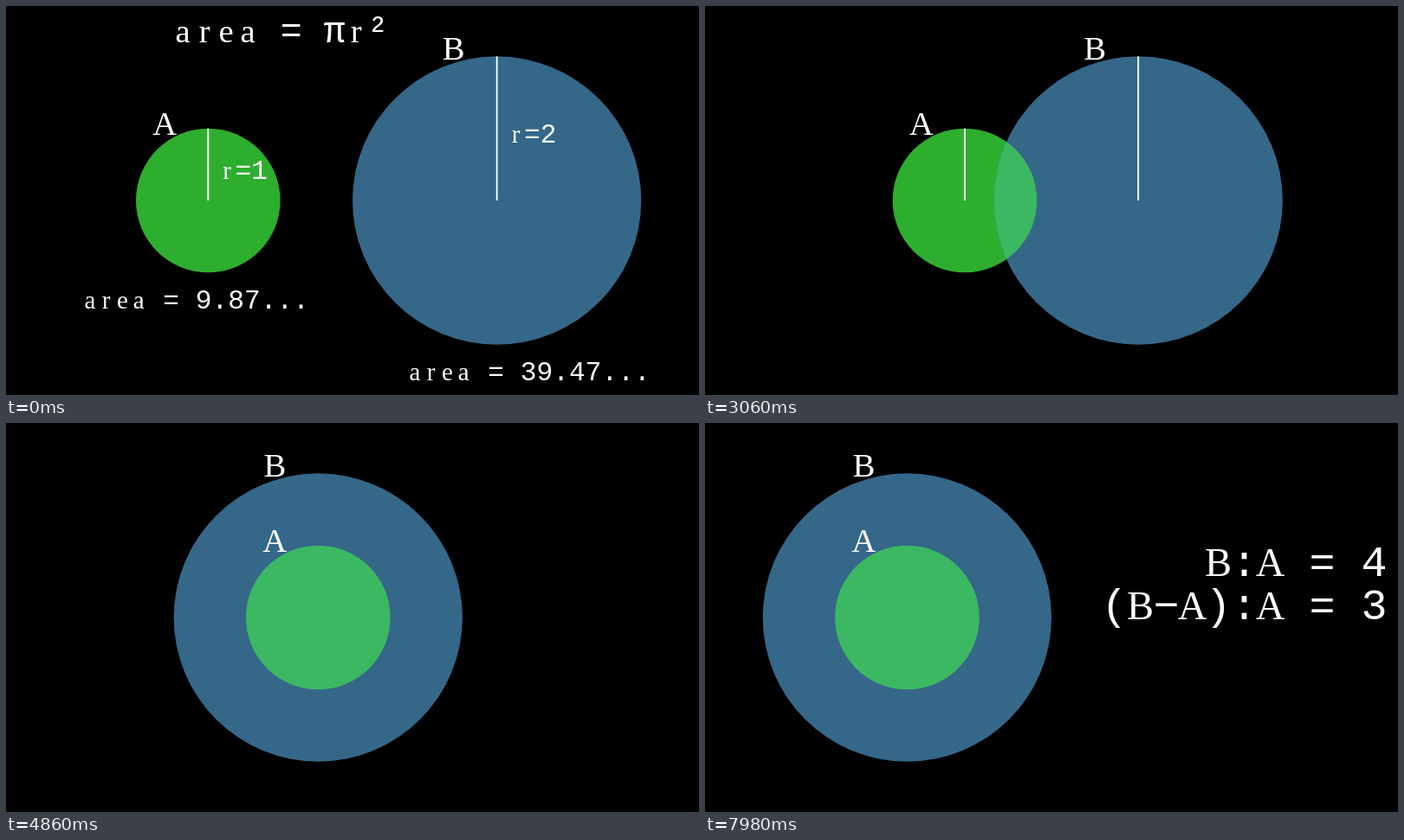
An HTML page with a canvas for the animation above (8000 ms loop, 800 px wide and 450 px high).

```html
<!DOCTYPE html>
<html lang="en">
<head>
<meta charset="utf-8">
<title>Circle areas</title>
<style>
html, body { margin: 0; width: 100%; height: 100%; overflow: hidden; background: #000; }
canvas { display: block; }
</style>
</head>
<body>
<canvas id="stage" width="800" height="450"></canvas>
<script>
const ctx = document.getElementById('stage').getContext('2d');
const LOOP = 8000, STEP = 60;
const MOVE = 2182, MERGE = 4360, SLIDE = 4336, END = 6536;
const SPEED = 166.67 / 2200;
const LEFT = 233.33, RIGHT = 566.67, MID = 400, CY = 225;
const R = 83.33;

function disc(x, r, color) {
  ctx.fillStyle = color;
  ctx.beginPath();
  ctx.arc(x, CY, r, 0, 2 * Math.PI);
  ctx.fill();
}

// Monospaced line; letters get a slab-like serif face
function write(str, x, y, size) {
  const pitch = size * 0.6;
  ctx.fillStyle = '#fff';
  ctx.textAlign = 'center';
  [...str].forEach((c, i) => {
    ctx.font = /[a-z]/i.test(c)
      ? `${size * 0.93}px "Liberation Serif", serif`
      : `${size}px "Liberation Mono", monospace`;
    ctx.fillText(c, x + (i + 0.5) * pitch, y);
  });
}

function radius(x, r) {
  ctx.fillStyle = '#fff';
  ctx.fillRect(x - 0.9, CY - r, 1.8, r);
}

function draw(t) {
  let a = LEFT, b = RIGHT;
  if (t >= MERGE) {
    a = b = Math.max(LEFT, MID - (t - SLIDE) * SPEED);
  } else if (t > MOVE) {
    const d = (t - MOVE) * SPEED;
    a += d;
    b -= d;
  }

  ctx.fillStyle = '#000';
  ctx.fillRect(0, 0, 800, 450);
  disc(a, R, '#2eae2e');
  disc(b, 2 * R, '#356789');
  ctx.save();
  ctx.clip();
  disc(a, R, '#3cb862');
  ctx.restore();

  if (t < MERGE) {
    radius(a, R);
    radius(b, 2 * R);
  }
  write('A', a - 62.5, 149, 41.67);
  write('B', b - 62.5, 62, 41.67);

  if (t < MOVE) {
    write('area = πr²', 191.67, 42, 41.67);
    write('r=1', a + 12.5, 200, 31.25);
    write('r=2', b + 12.5, 158, 31.25);
    write('area = 9.87...', 87.5, 350, 31.25);
    write('area = 39.47...', 462.5, 433, 31.25);
  }
  if (t >= END) {
    write('B:A = 4', 577.5, 177, 50);
    write('(B−A):A = 3', 457.5, 227, 50);
  }
}

function tick() {
  const t = performance.now() % LOOP;
  draw(Math.floor(t / STEP) * STEP);
  requestAnimationFrame(tick);
}
tick();
</script>
</body>
</html>
```
